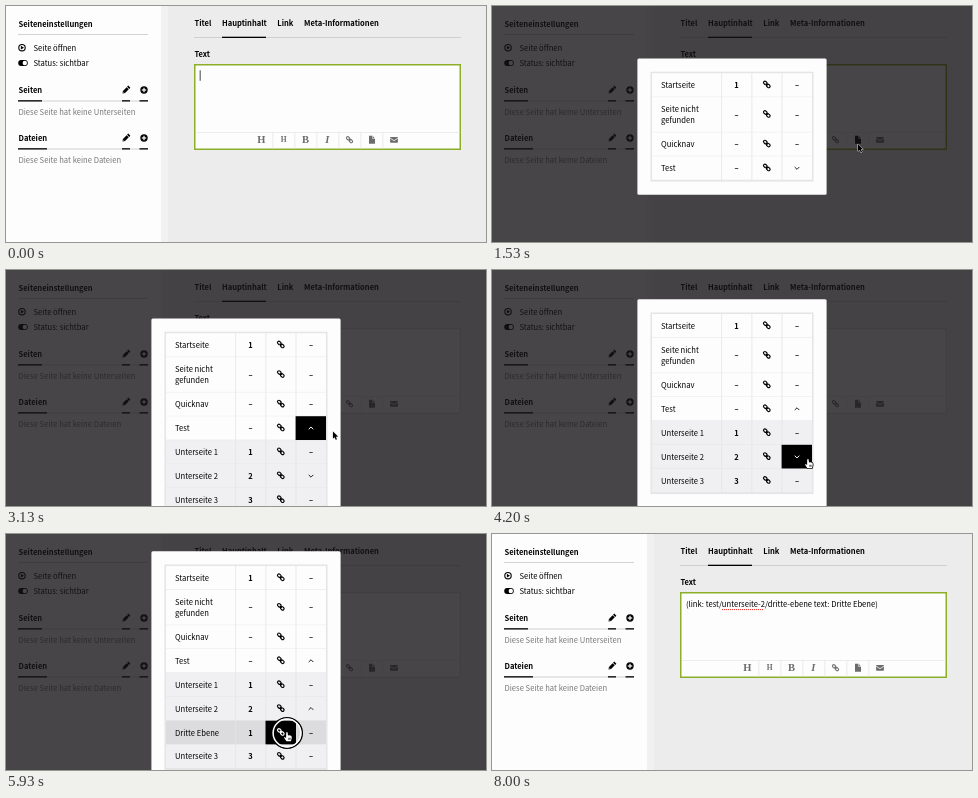
These frames come from a looping animation (480 px wide and 236 px high, 8070 ms). An HTML page with a canvas:

```html
<!DOCTYPE html>
<html lang="de">
<head>
<meta charset="utf-8">
<title>Seiten verlinken</title>
<style>
html, body { margin: 0; width: 100%; height: 100%; overflow: hidden; background: #ececed; }
canvas { display: block; width: 480px; height: 236px; }
</style>
</head>
<body>
<canvas id="stage"></canvas>
<script>
const W = 480, H = 236, LOOP = 8070;
const SANS = '"Noto Sans CJK SC", "Noto Sans CJK JP", "Noto Sans CJK", "Open Sans", sans-serif';
const SERIF = '"Liberation Serif", "Noto Serif", serif';
const canvas = document.getElementById('stage');
const g = canvas.getContext('2d');
const dpr = window.devicePixelRatio || 1;
canvas.width = W * dpr;
canvas.height = H * dpr;

// Timeline in ms
const OPEN = 1180, OPENED = 1730, EXPAND_1 = 2940, EXPAND_2 = 4455, SLIDE = 400;
const CLOSE = 6000, CLOSED = 6120;

const clamp = v => Math.max(0, Math.min(1, v));
const smooth = v => { v = clamp(v); return v * v * (3 - 2 * v); };
const ramp = (t, a, b) => clamp((t - a) / (b - a));
const within = (t, a, b) => t >= a && t < b;

function rect(x, y, w, h, color) {
  g.fillStyle = color;
  g.fillRect(x, y, w, h);
}

function pill(x, y, w, h, r) {
  g.beginPath();
  g.roundRect(x, y, w, h, r);
}

function disc(x, y, r) {
  g.beginPath();
  g.arc(x, y, r, 0, Math.PI * 2);
}

function shape(points) {
  g.beginPath();
  points.forEach(([x, y]) => g.lineTo(x, y));
  g.closePath();
}

function text(str, x, y, { color = '#000', bold = false, size = bold ? 7.55 : 7.65, align = 'left' } = {}) {
  g.font = `${bold ? 600 : 400} ${size}px ${SANS}`;
  g.textAlign = align;
  g.textBaseline = 'alphabetic';
  g.fillStyle = color;
  g.fillText(str, x, y);
}

function at(x, y, draw, angle = 0) {
  g.save();
  g.translate(x, y);
  g.rotate(angle);
  draw();
  g.restore();
}

// Icons
function linkIcon(x, y, color, scale = 1) {
  at(x, y, () => {
    g.scale(scale, scale);
    g.strokeStyle = color;
    g.lineWidth = 1.3;
    for (const dx of [-4.6, 0.2]) {
      pill(dx, -1.6, 4.4, 3.2, 1.5);
      g.stroke();
    }
    rect(-1.6, -0.55, 3.2, 1.1, color);
  }, Math.PI / 4);
}

function pencil(x, y) {
  at(x, y, () => {
    g.fillStyle = '#000';
    shape([[-5, 0], [-2.8, -1.5], [2.4, -1.5], [2.4, 1.5], [-2.8, 1.5]]);
    g.fill();
    rect(3, -1.5, 1.7, 3, '#000');
    rect(-3.6, -0.3, 1, 0.6, '#fff');
  }, -Math.PI / 4);
}

function plus(x, y) {
  g.fillStyle = '#000';
  disc(x, y, 3.7);
  g.fill();
  rect(x - 2.2, y - 0.6, 4.4, 1.2, '#fff');
  rect(x - 0.6, y - 2.2, 1.2, 4.4, '#fff');
}

function playIcon(x, y) {
  g.strokeStyle = g.fillStyle = '#000';
  g.lineWidth = 1.1;
  disc(x, y, 3.2);
  g.stroke();
  shape([[x - 1.1, y - 1.9], [x + 2, y], [x - 1.1, y + 1.9]]);
  g.fill();
}

function toggle(x, y) {
  g.fillStyle = '#000';
  pill(x - 4.8, y - 3, 9.6, 6, 3);
  g.fill();
  g.fillStyle = '#fff';
  disc(x + 1.8, y, 2.2);
  g.fill();
}

function fileIcon(x, y, color) {
  g.fillStyle = color;
  shape([[x - 3, y - 4], [x + 0.6, y - 4], [x + 3, y - 1.4], [x + 3, y + 4], [x - 3, y + 4]]);
  g.fill();
  g.strokeStyle = '#fdfdfd';
  g.lineWidth = 0.6;
  g.beginPath();
  g.moveTo(x + 0.6, y - 4);
  g.lineTo(x + 0.6, y - 1.3);
  g.lineTo(x + 3, y - 1.3);
  g.stroke();
}

function mailIcon(x, y, color) {
  g.fillStyle = color;
  pill(x - 3.9, y - 2.9, 7.8, 5.8, 0.7);
  g.fill();
  g.strokeStyle = '#fdfdfd';
  g.lineWidth = 0.8;
  g.beginPath();
  g.moveTo(x - 3.9, y - 1.6);
  g.lineTo(x, y + 0.9);
  g.lineTo(x + 3.9, y - 1.6);
  g.stroke();
}

function chevron(x, y, up, color) {
  const d = up ? -1 : 1;
  g.strokeStyle = color;
  g.lineWidth = 1;
  g.beginPath();
  g.moveTo(x - 2.3, y - 1.1 * d);
  g.lineTo(x, y + 1.2 * d);
  g.lineTo(x + 2.3, y - 1.1 * d);
  g.stroke();
}

// Page behind the dialog
function section(title, y, lineEnd, note) {
  text(title, 12.5, y + 3, { bold: true });
  pencil(120, y);
  plus(138, y);
  rect(12, y + 10.5, 130, 1, '#d2d2d3');
  rect(12, y + 10.2, lineEnd - 12, 1.3, '#000');
  rect(116, y + 10.2, 8, 1.3, '#000');
  rect(133.5, y + 10.2, 8.5, 1.3, '#000');
  text(note, 12.5, y + 25.2, { color: '#777' });
}

function sidebar() {
  rect(0, 0, 155, H, '#fdfdfd');
  text('Seiteneinstellungen', 12.5, 21.2, { bold: true });
  rect(12, 28, 130, 1, '#d2d2d3');
  playIcon(16, 41.7);
  text('Seite öffnen', 27.5, 44.9);
  toggle(17, 57);
  text('Status: sichtbar', 27.5, 60);
  section('Seiten', 84, 36, 'Diese Seite hat keine Unterseiten');
  section('Dateien', 132, 41, 'Diese Seite hat keine Dateien');
}

function letter(ch, x, y, size, style, color) {
  g.font = `${style} ${size}px ${SERIF}`;
  g.textAlign = 'center';
  g.fillStyle = color;
  g.fillText(ch, x, y);
}

function toolbar(t) {
  const gray = '#6c6c6e';
  rect(190, 126, 264, 0.8, '#e9e9ea');
  for (let x = 266.5; x < 380; x += 22) rect(x, 126, 0.8, 16.5, '#e6e6e7');
  letter('H', 255.3, 137.2, 10.5, 'bold', gray);
  letter('H', 277.7, 136.3, 7.5, 'bold', gray);
  letter('B', 299.5, 137.2, 10.5, 'bold', gray);
  letter('I', 321.3, 137.2, 10.5, 'italic bold', gray);
  linkIcon(343.5, 133.7, gray, 0.82);
  fileIcon(366, 133.8, within(t, 760, 1950) ? '#000' : gray);
  mailIcon(388, 133.8, gray);
}

function editor(t) {
  const tabs = [['Titel', 188.5], ['Hauptinhalt', 216], ['Link', 271.3], ['Meta-Informationen', 298]];
  for (const [name, x] of tabs) text(name, x, 20.4, { bold: true });
  rect(188, 31, 267, 1, '#d0d0d1');
  rect(216, 30.7, 44, 1.3, '#000');
  text('Text', 188.5, 50.5, { bold: true });

  const focused = !within(t, 2930, CLOSE);
  rect(188, 58, 267, 86, '#fdfdfd');
  g.strokeStyle = focused ? '#8dae28' : '#d3d3d4';
  g.lineWidth = focused ? 1.5 : 1;
  g.strokeRect(188.75, 58.75, 265.5, 84.5);

  if (t >= CLOSE) {
    text('(link: test/unterseite-2/dritte-ebene text: Dritte Ebene)', 194, 72.8);
    for (let x = 230; x < 272; x += 2) rect(x, 75, 1.1, 1.1, '#f03c32');
  } else if (t < OPEN && t % 1000 < 500) {
    rect(193.7, 64.3, 0.9, 10.5, '#333');
  }
  toolbar(t);
}

// Dialog with the page tree
const ROWS = [
  { name: 'Startseite', num: '1' },
  { name: 'Seite nicht gefunden', num: '–', tall: true },
  { name: 'Quicknav', num: '–' },
  { name: 'Test', num: '–', opens: EXPAND_1, hot: [2760, 3220] },
  { name: 'Unterseite 1', num: '1', level: 1, from: EXPAND_1 },
  { name: 'Unterseite 2', num: '2', level: 1, from: EXPAND_1, opens: EXPAND_2, hot: [4040, EXPAND_2] },
  { name: 'Dritte Ebene', num: '1', level: 2, from: EXPAND_2, hotLink: [5560, CLOSED] },
  { name: 'Unterseite 3', num: '3', level: 1, from: EXPAND_1 },
];
const LEVEL_BG = ['#fdfdfd', '#f0eff1', '#dcdbdd'];
const RULE = '#e5e4e6';
const ROW = 23.9, TALL = 35.2, COLS = [160, 229.3, 259.5, 289.6, 320];

function modalTop(t) {
  const open = 22 + 43 * smooth(ramp(t, OPEN, OPENED));
  const first = 36 * smooth(ramp(t, EXPAND_1, EXPAND_1 + SLIDE));
  const second = 12 * smooth(ramp(t, EXPAND_2, EXPAND_2 + SLIDE));
  return open - first - second;
}

function tableRow(row, y, h, t) {
  const mid = y + h / 2, base = mid + 2.9;
  rect(160, y, 160, h, LEVEL_BG[row.level || 0]);
  rect(160, y + h - 0.4, 160, 0.8, RULE);
  for (const x of COLS.slice(1, 4)) rect(x, y, 0.8, h, RULE);

  if (row.tall) {
    text('Seite nicht', 169, base - 5.5);
    text('gefunden', 169, base + 5.3);
  } else {
    text(row.name, 169, base);
  }
  text(row.num, 244.5, base, { bold: true, align: 'center' });

  const hotLink = row.hotLink && within(t, ...row.hotLink);
  if (hotLink) rect(COLS[2], y, 30.5, h, '#000');
  linkIcon(274.8, mid - 0.7, hotLink ? '#fff' : '#000', 0.88);

  const hot = row.hot && within(t, ...row.hot);
  if (hot) rect(COLS[3], y, 30.4, h, '#000');
  if (row.opens) chevron(305, mid, t >= row.opens, hot ? '#fff' : '#222');
  else text('–', 305, base, { bold: true, align: 'center' });
}

function modal(t) {
  const top = modalTop(t);
  const rows = ROWS.filter(r => !r.from || t >= r.from);
  const height = rows.reduce((sum, r) => sum + (r.tall ? TALL : ROW), 0);
  g.fillStyle = '#fdfdfd';
  pill(145.4, top + 0.3, 189.2, height + 29.4, 1.5);
  g.fill();
  rect(158.5, top + 13.5, 163, height + 3, RULE);
  let y = top + 15;
  for (const row of rows) {
    const h = row.tall ? TALL : ROW;
    tableRow(row, y, h, t);
    y += h;
  }
}

// Pointer: time, x, y
const PATH = [
  [70, 468, 183], [800, 366, 138], [1930, 366, 138], [2700, 309, 167], [2940, 309, 167],
  [3400, 357, 152], [3600, 357, 152], [4120, 316, 189], [4380, 316, 189], [4830, 365, 188],
  [5000, 365, 188], [5700, 281, 198], [6200, 281, 198], [7000, 284, 202], [7700, 290, 240],
];
const HANDS = [[740, OPEN], [2640, 2990], [4030, 4420], [5560, CLOSED]];
const CLICKS = [[930, 1130], [2760, 2940], [4250, 4400], [5850, 6050]];

function pointerAt(t) {
  const i = PATH.findIndex(p => p[0] > t);
  if (i < 1) return null;
  const [t0, x0, y0] = PATH[i - 1], [t1, x1, y1] = PATH[i];
  const k = smooth(ramp(t, t0, t1));
  return [x0 + (x1 - x0) * k, y0 + (y1 - y0) * k];
}

function arrow() {
  g.scale(0.87, 0.87);
  shape([[0, 0], [0, 8.3], [1.9, 6.6], [3.2, 9.6], [4.6, 9], [3.3, 6.1], [5.9, 6]]);
  g.lineJoin = 'round';
  g.strokeStyle = '#e4e4e4';
  g.lineWidth = 1.1;
  g.stroke();
  g.fillStyle = '#000';
  g.fill();
}

function hand() {
  shape([[-0.8, 0.2], [0.6, 0.2], [1, 3.4], [2.2, 3.2], [3.3, 3.6], [4.5, 4], [4.8, 6.2],
    [3.9, 9.2], [-0.6, 9.2], [-2.9, 5.8], [-2.4, 4.9], [-0.9, 6]]);
  g.lineJoin = 'round';
  g.strokeStyle = '#000';
  g.lineWidth = 1.4;
  g.stroke();
  g.fillStyle = '#fff';
  g.fill();
  for (const x of [1, 2.4, 3.6]) rect(x, 5.8, 0.5, 2, '#000');
}

function ring() {
  for (const [r, color] of [[15.3, '#000'], [13.9, '#fff']]) {
    g.strokeStyle = color;
    g.lineWidth = 1.5;
    disc(0, 1, r);
    g.stroke();
  }
}

function pointer(t) {
  const pos = pointerAt(t);
  if (!pos) return;
  const isIn = spans => spans.some(s => within(t, ...s));
  at(pos[0], pos[1], () => {
    if (isIn(CLICKS)) ring();
    if (isIn(HANDS)) hand();
    else arrow();
  });
}

function draw(t) {
  g.setTransform(dpr, 0, 0, dpr, 0, 0);
  rect(0, 0, W, H, '#ececed');
  rect(155, 0, 7, H, '#f1f1f2');
  sidebar();
  editor(t);
  const shown = ramp(t, OPEN, OPEN + 200) * (1 - ramp(t, CLOSE, CLOSED));
  if (shown > 0) {
    rect(0, 0, W, H, `rgba(21,18,21,${0.78 * shown})`);
    g.globalAlpha = shown;
    modal(t);
    g.globalAlpha = 1;
  }
  pointer(t);
}

const start = performance.now();
function frame(now) {
  draw(Math.max(0, now - start) % LOOP);
  requestAnimationFrame(frame);
}
draw(0);
requestAnimationFrame(frame);
</script>
</body>
</html>
```
